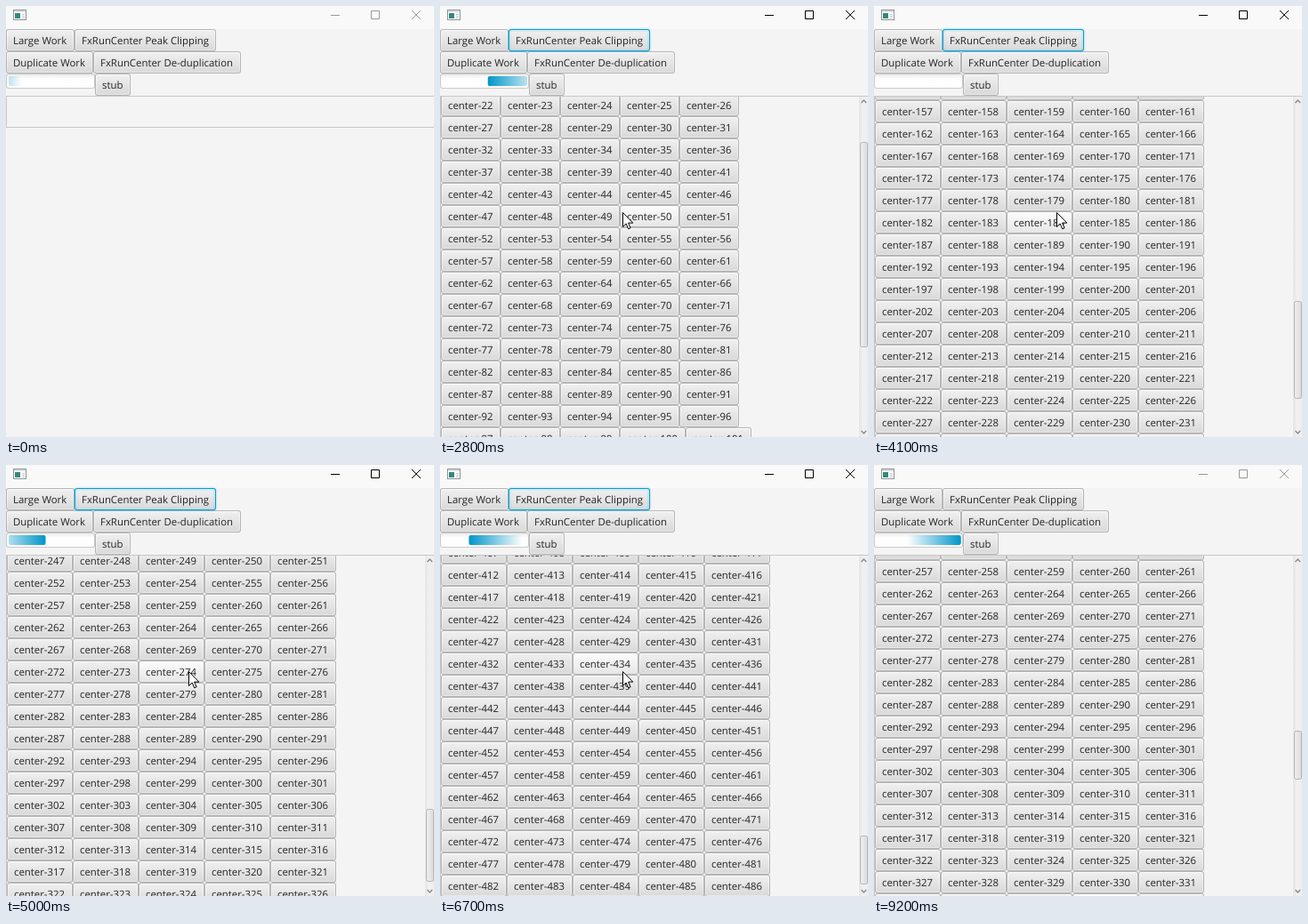
Recreate the animation shown at these times as an HTML page. Size 481 by 485 pixels, loop 9300 ms.

```html
<!DOCTYPE html>
<html lang="en">
<head>
<meta charset="utf-8">
<title>Button list</title>
<style>
html, body { margin: 0; width: 100%; height: 100%; overflow: hidden; background: #f4f4f4; }
svg { display: block; width: 481px; height: 485px; }
text { font: 11.4px "Open Sans", "Noto Sans", sans-serif; fill: #242424; text-rendering: geometricPrecision; white-space: pre; }
</style>
</head>
<body>
<svg id="stage" viewBox="0 0 481 485" xmlns="http://www.w3.org/2000/svg">
  <defs>
    <linearGradient id="edge" x2="0" y2="1"><stop stop-color="#fbfbfb"/><stop offset="1" stop-color="#e6e6e6"/></linearGradient>
    <linearGradient id="body" x2="0" y2="1"><stop stop-color="#efefef"/><stop offset="1" stop-color="#dadada"/></linearGradient>
    <linearGradient id="hover" x2="0" y2="1"><stop stop-color="#fbfbfb"/><stop offset="1" stop-color="#e7e7e7"/></linearGradient>
    <linearGradient id="thumbFill"><stop stop-color="#f0f0f0"/><stop offset="1" stop-color="#dadada"/></linearGradient>
    <linearGradient id="trackFill"><stop stop-color="#e4e4e4"/><stop offset=".4" stop-color="#f0f0f0"/><stop offset="1" stop-color="#eeeeee"/></linearGradient>
    <linearGradient id="well" x2="0" y2="1"><stop stop-color="#ececec"/><stop offset=".3" stop-color="#fdfdfd"/><stop offset="1" stop-color="#fff"/></linearGradient>
    <linearGradient id="toRight"><stop stop-color="#0096c9" stop-opacity="0"/><stop offset="1" stop-color="#0096c9"/></linearGradient>
    <linearGradient id="toLeft"><stop stop-color="#0096c9"/><stop offset="1" stop-color="#0096c9" stop-opacity="0"/></linearGradient>
    <clipPath id="listClip"><rect x="1" y="102" width="480" height="383"/></clipPath>
    <clipPath id="barClip"><rect x="3" y="79" width="95" height="11" rx="2"/></clipPath>
  </defs>

  <rect width="481" height="485" fill="#f4f4f4"/>
  <rect width="481" height="26" fill="#f9f9f9"/>
  <rect x="8.5" y="4.5" width="14" height="11" fill="#fff" stroke="#8c9296"/>
  <path d="M9 6h13" stroke="#b5bcc0"/>
  <rect x="10" y="8" width="6" height="6" fill="#35877f"/>
  <path d="M18 9.5h3M18 11.5h3M18 13.5h3" stroke="#c4c8ca"/>
  <path id="controls" d="M365 10.5h10M410.5 5.5h9v9h-9zM456 5l10 10M466 5l-10 10" fill="none"/>

  <g id="toolbar"></g>

  <rect x="0" y="76" width="100" height="17" rx="3" fill="#cacaca"/>
  <rect x="1" y="77" width="98" height="15" rx="2" fill="url(#well)"/>
  <g clip-path="url(#barClip)"><rect id="bar" y="79" width="60" height="11" rx="2"/></g>

  <rect id="pane" x=".5" y="101.5" width="490" fill="none" stroke="#c8c8c8"/>
  <g id="list" clip-path="url(#listClip)"></g>

  <g id="scroller">
    <rect x="471" y="102" width="10" height="383" fill="url(#trackFill)"/>
    <path d="M473.5 109l2.8-3 2.8 3M473.5 478l2.8 3 2.8-3" fill="none" stroke="#858585" stroke-width="1.2"/>
    <rect id="thumb" x="472.5" width="8" rx="2" fill="url(#thumbFill)" stroke="#b5b5b5"/>
  </g>

  <path id="pointer" d="M.5 .5v16l3.7-3.5 2.5 5.8 2.4-1-2.5-5.7h5.2z" fill="#fff" stroke="#000"/>
</svg>
<script>
const LOOP = 9300, STEP = 100, TOP = 102, VIEW = 383, ROW = 25, TOTAL = 500;
const CLICK = 1527, BLUR = 9150;
const $ = id => document.getElementById(id);

function set(el, attrs) {
  for (const k in attrs) el.setAttribute(k, attrs[k]);
  return el;
}

function add(parent, tag, attrs = {}) {
  return parent.appendChild(set(document.createElementNS("http://www.w3.org/2000/svg", tag), attrs));
}

function makeButton(parent) {
  const g = add(parent, "g");
  const layers = [0, 1, 2].map(i => add(g, "rect", {
    x: i, y: i, height: ROW - 2 * i, rx: 3 - i, fill: ["#b5b5b5", "url(#edge)", "url(#body)"][i]
  }));
  return { g, layers, label: add(g, "text", { x: 8, y: 17 }) };
}

function placeButton(b, x, y, w, text) {
  b.box = [x, y, w];
  set(b.g, { transform: `translate(${x} ${y})`, display: "inline" });
  b.layers.forEach((r, i) => r.setAttribute("width", w - 2 * i));
  if (b.label.textContent !== text) b.label.textContent = text;
}

function lightButton(b, [px, py]) {
  const [x, y, w] = b.box;
  const over = px >= x && px < x + w && py >= y && py < y + ROW;
  b.layers[2].setAttribute("fill", over ? "url(#hover)" : "url(#body)");
}

const toolbar = [
  [0, 26, 77, "Large Work"],
  [0, 51, 98, "Duplicate Work"],
  [98, 51, 166, "FxRunCenter De-duplication"],
  [100, 76, 40, "stub"],
  [77, 26, 159, "FxRunCenter Peak Clipping"]
].map(spec => {
  const b = makeButton($("toolbar"));
  placeButton(b, ...spec);
  return b;
});
const peak = toolbar[4];
const halo = add(peak.g, "rect", {
  x: .6, y: .6, width: 157.8, height: 23.8, rx: 3,
  fill: "none", stroke: "#039ed3", "stroke-opacity": .14, "stroke-width": 4
});
const pool = Array.from({ length: 17 * 6 }, () => makeButton($("list")));

// Keys are [time, value, ...], joined by straight lines
const pointerKeys = [
  [0, 490, 122], [100, 474, 118], [500, 360, 84], [1000, 243, 38], [1400, 186, 38],
  [1800, 176, 38], [2200, 176, 38], [2700, 205, 232], [7600, 205, 232],
  [8100, 206, 233], [8600, 206, 233], [8900, 230, 490]
];
const scrollKeys = [
  [2600, 0], [3500, 463], [5000, 1232], [6700, 2041], [6800, 2080],
  [7300, 2080], [8100, 1507], [8700, 1270]
];
const thumbKeys = [
  [2600, 112], [3500, 296], [5000, 387], [6700, 417], [7300, 418], [8100, 333], [8700, 299]
];

function along(keys, t) {
  const j = keys.findIndex(k => k[0] > t);
  if (j < 1) return (j ? keys[keys.length - 1] : keys[0]).slice(1);
  const a = keys[j - 1], b = keys[j], f = (t - a[0]) / (b[0] - a[0]);
  return a.slice(1).map((v, i) => v + (b[i + 1] - v) * f);
}

const countAt = t => t < CLICK ? 0 : Math.min(TOTAL, Math.floor(36.01 + (t - 1900) * .0965));
const rowStart = r => r < 2 ? r * 6 : 12 + (r - 2) * 5;
const rowsFor = n => n <= 12 ? Math.ceil(n / 6) : 2 + Math.ceil((n - 12) / 5);
const buttonWidth = n => n < 10 ? 61 : n < 100 ? 67 : 74;

function drawList(count, scroll, mouse) {
  let used = 0;
  const first = Math.floor(scroll / ROW);
  for (let r = first; r < first + 17; r++) {
    let x = 1;
    for (let n = rowStart(r); n < Math.min(count, rowStart(r + 1)); n++) {
      const b = pool[used++], w = buttonWidth(n);
      placeButton(b, x, TOP + r * ROW - scroll, w, "center-" + n);
      lightButton(b, mouse);
      x += w;
    }
  }
  for (; used < pool.length; used++) pool[used].g.setAttribute("display", "none");
}

function drawBar(t) {
  const half = 1850, phase = ((t - 525) / half % 2 + 2) % 2;
  const right = phase < 1;
  set($("bar"), {
    x: -98 + 197 * (right ? phase : 2 - phase),
    fill: right ? "url(#toRight)" : "url(#toLeft)"
  });
}

function draw(t) {
  const focused = t >= CLICK && t < BLUR;
  const mouse = along(pointerKeys, t).map(Math.round);
  const count = countAt(t), height = rowsFor(count) * ROW;
  const overflow = height > VIEW;

  $("controls").setAttribute("stroke", focused ? "#000" : "#999");
  toolbar.forEach(b => lightButton(b, mouse));
  peak.layers[0].setAttribute("fill", focused ? "#039ed3" : "#b5b5b5");
  halo.setAttribute("display", focused ? "inline" : "none");
  drawBar(t);

  $("pane").setAttribute("height", overflow ? 400 : Math.max(35, height + 1));
  drawList(count, Math.round(along(scrollKeys, t)[0]), mouse);

  $("scroller").setAttribute("display", overflow ? "inline" : "none");
  if (overflow) set($("thumb"), {
    y: Math.round(along(thumbKeys, t)[0]) + .5,
    height: Math.round(363 * VIEW / height - 2)
  });
  $("pointer").setAttribute("transform", `translate(${mouse})`);
}

const start = performance.now();
let last = -1;
function tick() {
  const t = Math.floor((performance.now() - start) % LOOP / STEP) * STEP;
  if (t !== last) draw(last = t);
  requestAnimationFrame(tick);
}
tick();
</script>
</body>
</html>
```
